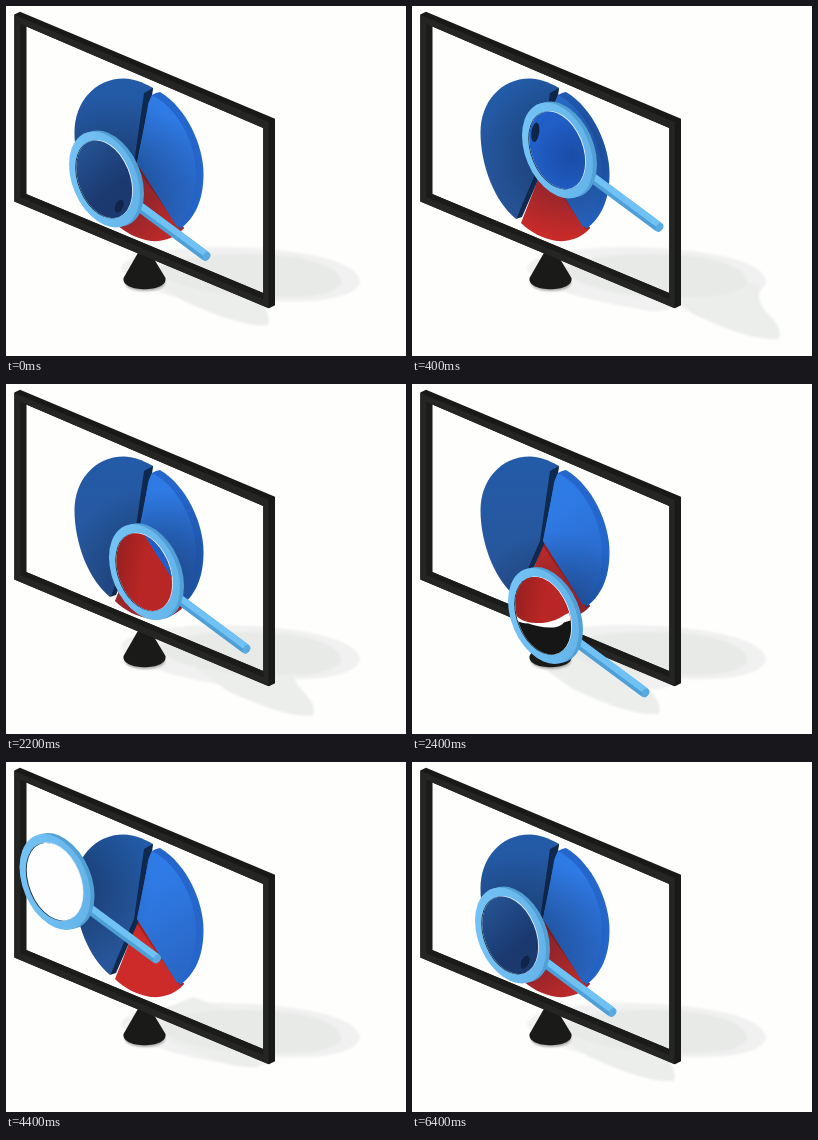
An HTML page that plays this animation: 400x350 px, repeating every 8.04 s.

```html
<!DOCTYPE html>
<html lang="en">
<head>
<meta charset="utf-8">
<title>Magnifier over a pie chart</title>
<style>
  html, body { margin: 0; height: 100%; overflow: hidden; background: #fefefc; }
  svg { display: block; width: 100vw; height: 100vh; }
</style>
</head>
<body>
<svg viewBox="0 0 400 350">
  <defs>
    <linearGradient id="leftBlue" x1="0" y1="0" x2="0" y2="1">
      <stop offset="0" stop-color="#235ba8"/><stop offset="1" stop-color="#285598"/>
    </linearGradient>
    <linearGradient id="rightBlue" x1="0" y1="0" x2=".3" y2="1">
      <stop offset=".3" stop-color="#2f7be6"/><stop offset="1" stop-color="#2a68c8"/>
    </linearGradient>
    <linearGradient id="glassLeft" gradientUnits="userSpaceOnUse" x1="92" y1="160" x2="106" y2="176">
      <stop offset="0" stop-color="#24508f"/><stop offset="1" stop-color="#1b386f"/>
    </linearGradient>
    <radialGradient id="glassRight" gradientUnits="userSpaceOnUse" cx="153" cy="147" r="18">
      <stop offset="0" stop-color="#1a4ca6"/><stop offset="1" stop-color="#215fc8"/>
    </radialGradient>
    <linearGradient id="glassRed" gradientUnits="userSpaceOnUse" x1="121" y1="222" x2="133" y2="224">
      <stop offset="0" stop-color="#9a2020"/><stop offset="1" stop-color="#b82625"/>
    </linearGradient>
    <linearGradient id="rim">
      <stop offset="0" stop-color="#75c3f5"/><stop offset="1" stop-color="#64b4ea"/>
    </linearGradient>
    <radialGradient id="shade">
      <stop offset=".3" stop-color="#0a1830" stop-opacity=".34"/>
      <stop offset="1" stop-color="#0a1830" stop-opacity="0"/>
    </radialGradient>
    <filter id="soft"><feGaussianBlur stdDeviation="1.2"/></filter>

    <path id="leftFace" d="M147 82C136 76 127 72.500 118 72.500C88 72.500 68.500 97 68.500 126C68.500 160 83 196 104 213L130 158Z"/>
    <path id="rightBody" d="M146 89L150 87L154 86C181 102 197.500 140 197.500 168C197.500 194 189 212 174 223L131 157L143 96Z"/>
    <path id="rightFace" d="M146 89C172 102 190 138 190 168C190 190 184 208 171 221L131 157L143 96Z"/>
    <path id="redBody" d="M132 158L178 222C170 232 157 236 145 235C131 233 118 226 109 217Z"/>
    <clipPath id="pieClip">
      <use href="#leftFace"/><use href="#rightBody"/><use href="#redBody"/>
    </clipPath>
    <clipPath id="glassClip"><ellipse rx="28" ry="37" transform="matrix(1 .42 0 1 -2.300 .3)"/></clipPath>
  </defs>

  <!-- floor shadows -->
  <g filter="url(#soft)">
    <path fill="#f0f1f0" d="M115 262C118 248 165 242 210 241C270 241 350 250 354 275C352 291 315 297 270 295C262 303 250 306 238 305C200 298 125 286 115 262Z"/>
    <path id="lensShadow" fill="#eceeec" d="M0 0C-24 2 -58 -12 -86 -25L-118 -48L-65 -70L-18 -52C-28 -26 6 -22 0 0Z"/>
    <path fill="#e8eae8" d="M150 264C175 247 230 246 270 249C310 252 338 264 335 278C325 292 290 292 262 291C220 292 170 284 150 264Z"/>
  </g>

  <!-- stand -->
  <ellipse cx="139" cy="277" rx="20" ry="8" fill="#a9aaa8" filter="url(#soft)"/>
  <path fill="#1a1b19" d="M133 245L117.500 272C115 287 162 287 159.500 272L145 248Z"/>

  <!-- monitor -->
  <g fill-rule="evenodd">
    <path fill="#191a18" d="M8.300 8.500L14 5.700L269 112.700V299.300L263 302.300L8.300 195.500ZM20.300 20.500V188L257.200 287V122Z"/>
    <path fill="#252624" d="M8.300 9L262.500 116V302.300L8.300 195.500ZM14.500 18V191L257.200 293V122Z"/>
    <path fill="#1b1c1a" d="M14.500 18L20.300 20.500V188L257.200 287V293L14.500 191Z"/>
  </g>

  <!-- pie chart -->
  <use href="#redBody" fill="#cc2b29"/>
  <path fill="#a81e1e" d="M132 158L178 222L174 224L131 162Z"/>
  <use href="#leftFace" fill="url(#leftBlue)"/>
  <path fill="#10294f" d="M147 82L146 90L142 98L133 158L110 211L104 213L128 157L138 87Z"/>
  <use href="#rightBody" fill="#2466cb"/>
  <use href="#rightFace" fill="url(#rightBlue)"/>
  <g clip-path="url(#pieClip)"><circle id="pieShade" r="88" fill="url(#shade)"/></g>

  <!-- magnifying glass -->
  <g id="lens">
    <g stroke-linecap="round">
      <path d="M34.500 29L98.500 76.500" stroke="#4e9fd6" stroke-width="10"/>
      <path d="M35.500 27.500L99.500 75" stroke="#70c2f5" stroke-width="6.500"/>
      <ellipse cx="100" cy="77.500" rx="3.400" ry="4.600" fill="#58aae0" transform="rotate(37 100 77.500)"/>
    </g>
    <ellipse rx="35.500" ry="45.500" transform="matrix(1 .42 0 1 2 -.5)" fill="#529fd5"/>
    <ellipse rx="35.500" ry="45.500" transform="matrix(1 .42 0 1 -2 .5)" fill="url(#rim)"/>
    <ellipse rx="28" ry="37" transform="matrix(1 .42 0 1 -1.500 -.2)" fill="#e3edf3"/>
    <ellipse rx="28" ry="37.200" transform="matrix(1 .42 0 1 -3.200 .4)" fill="#1d3347"/>
    <g clip-path="url(#glassClip)">
      <g id="magnified">
        <rect width="400" height="350" fill="#fefefe"/>
        <use href="#redBody" fill="url(#glassRed)"/>
        <path fill="url(#glassRed)" d="M118 205H150V236H118Z"/>
        <use href="#leftFace" fill="url(#glassLeft)"/>
        <path fill="url(#glassRight)" d="M142 88C172 102 192 138 192 168C192 190 183 208 171 221L130 157Z"/>
        <path fill="#fefefe" d="M118 229C121 232 123 234.300 128 234.700C134 235.200 138 233.800 142 231.200L150 227V240H118Z"/>
        <path fill="#151615" d="M118 231.500C121 234.500 123 234.800 126 235C131 236.800 139 238 141.500 234.500L150 232V256H118Z"/>
        <ellipse cx="137" cy="136.300" rx="1.700" ry="4.300" transform="rotate(8 137 136.300)" fill="#0f2547"/>
        <ellipse cx="106" cy="184.800" rx="1.700" ry="3" transform="rotate(25 106 184.800)" fill="#10244a"/>
      </g>
    </g>
  </g>
</svg>
<script>
  const LOOP = 8040, LEG = 2000, TICK = 40, STEPS = 10, ZOOM = 2.3;
  // Lens centre and the tip of its floor shadow at each stop.
  const stops = [
    { lens: [100.5, 173], shadow: [262, 319] },
    { lens: [147.5, 144], shadow: [367, 333] },
    { lens: [133.5, 231.5], shadow: [247, 330] },
    { lens: [51, 119.5], shadow: [252, 305] }
  ];
  const byId = id => document.getElementById(id);
  const [lens, magnified, lensShadow, pieShade] =
    ['lens', 'magnified', 'lensShadow', 'pieShade'].map(byId);
  const ease = u => (1 - Math.cos(Math.PI * u)) / 2;
  const mix = (a, b, u) => a.map((v, i) => v + (b[i] - v) * u);
  const move = (node, [x, y]) => node.setAttribute('transform', `translate(${x} ${y})`);

  function draw(time) {
    const t = (time % LOOP - TICK + LOOP) % LOOP;
    const leg = Math.min(3, Math.floor(t / LEG));
    const step = Math.min(STEPS, Math.floor((t - leg * LEG) / TICK) + 1);
    const u = ease(step / STEPS);
    const from = stops[leg], to = stops[(leg + 1) % stops.length];
    const [x, y] = mix(from.lens, to.lens, u);
    move(lens, [x, y]);
    move(pieShade, [x + 8, y + 4]);
    move(lensShadow, mix(from.shadow, to.shadow, u));
    magnified.setAttribute('transform', `scale(${ZOOM}) translate(${-x} ${-y})`);
  }

  const start = performance.now();
  function tick() {
    draw(performance.now() - start);
    requestAnimationFrame(tick);
  }
  tick();
</script>
</body>
</html>
```
